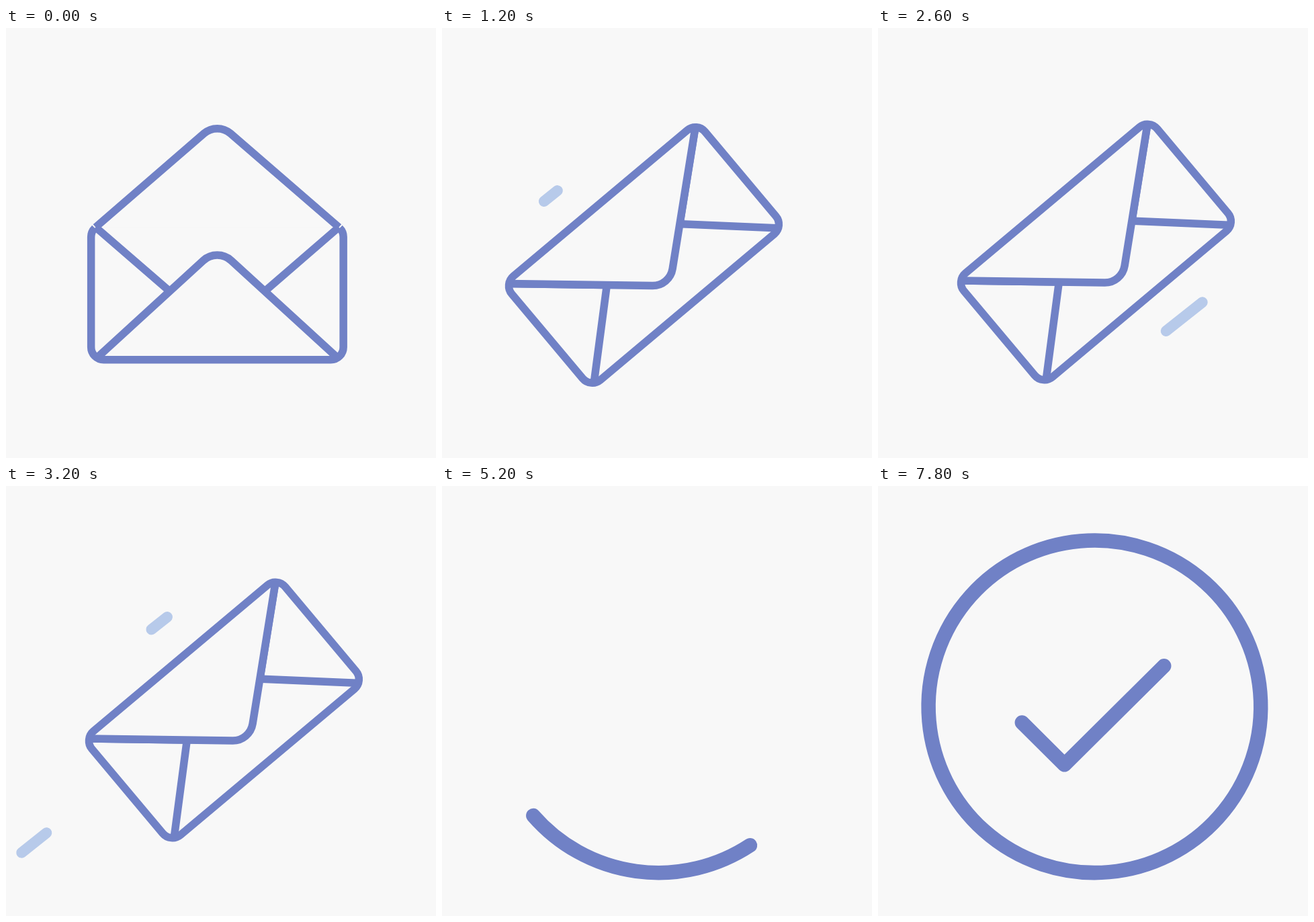
An HTML page with a canvas for the animation above (8 s loop, 640 px wide and 640 px high).

```html
<!DOCTYPE html>
<html lang="en">
<head>
<meta charset="utf-8">
<title>Sending mail</title>
<style>
  html, body { margin: 0; width: 100%; height: 100%; overflow: hidden; background: #f8f8f8; }
  canvas { display: block; width: 640px; height: 640px; }
</style>
</head>
<body>
<canvas id="stage" width="640" height="640"></canvas>
<script>
const ctx = document.getElementById('stage').getContext('2d');
const LOOP = 8000, PAPER = '#f8f8f8', INK = '#7081c6', WIND = '#b7caea';
const PI = Math.PI, rad = deg => deg * PI / 180;
const mix = (a, b, u) => a + (b - a) * u;
const progress = (t, from, to) => Math.min(1, Math.max(0, (t - from) / (to - from)));
const smooth = u => (1 - Math.cos(PI * u)) / 2;

function stroke(color, width) {
  ctx.strokeStyle = color;
  ctx.lineWidth = width;
  ctx.stroke();
}

// ---- Wind streaks: x, y and time of full length, size ----
const streaks = [
  [196.3, 222.6, 1025, 1],
  [240, 129, 2000, 1],
  ...[3050, 4100].map(t => [260, 179, t, 1]),
  ...[2000, 3050, 4100].map(t => [92, 491, t, 60 / 38]),
  ...[1850, 2900, 3950].map(t => [398, 475.5, t, 1])
];

function drawStreak(t, [x, y, peak, size]) {
  const p = t - peak;
  if (p <= -400 || p >= 300) return;
  const late = progress(p, 0, 300);
  const grow = 1 - (1 - progress(p, -400, 0)) ** 2;
  const head = p < 0 ? mix(85, -38, grow) : mix(-38, -49, late);
  const tail = p < 0 ? mix(85, 0, progress(p, -300, 0)) : -49 * late ** 1.3;
  ctx.beginPath();
  for (const d of [tail, head]) ctx.lineTo(x + d * size, y - d * size * 0.795);
  ctx.lineCap = 'round';
  stroke(WIND, 16);
}

// ---- Envelope ----
const LOW = [324.4, 333.5], HIGH = [354.4, 293.8];
const entry = [[700, 314.4, 393], [1100, 301, 355], [1200, 300.3, 338], [1400, ...LOW]];

function envelopeCenter(t) {
  if (t <= 700) return entry[0].slice(1);
  if (t < 1400) {
    const i = entry.findIndex(k => k[0] > t);
    const [t0, x0, y0] = entry[i - 1], [t1, x1, y1] = entry[i];
    const u = progress(t, t0, t1);
    return [mix(x0, x1, u), mix(y0, y1, u)];
  }
  if (t < 4100) {
    const u = (1 - Math.cos(PI * (t - 1400) / 300)) / 2;
    return LOW.map((v, i) => mix(v, HIGH[i], u));
  }
  const u = progress(t, 4100, 4400) ** 2;
  return [HIGH[0] + 560 * u, HIGH[1] - 470 * u];
}

function body(closed) {
  const r = 18.75, end = closed ? PI / 2 : PI / 4;
  ctx.beginPath();
  ctx.arc(-169, -82, r, PI + end, PI, true);
  ctx.arc(-169, 82, r, PI, PI / 2, true);
  ctx.arc(169, 82, r, PI / 2, 0, true);
  ctx.arc(169, -82, r, 0, -end, true);
  if (closed) ctx.closePath();
}

// A rounded peak spanning the envelope; fold = -1 turns it over its base.
function peak(halfWidth, base, tip, radius, fold = 1) {
  ctx.save();
  ctx.translate(0, base);
  ctx.scale(1, fold);
  ctx.beginPath();
  ctx.moveTo(-halfWidth, 0);
  ctx.arcTo(0, tip - base, halfWidth, 0, radius);
  ctx.lineTo(halfWidth, 0);
  ctx.restore();
  ctx.fill();
  stroke(INK, 11.5);
}
const flap = fold => peak(181, -96.5, 60, 30, fold);

function drawEnvelope(t) {
  const fold = -Math.cos(PI * smooth(progress(t, 300, 750)));
  const closed = fold > 0;
  ctx.save();
  ctx.translate(...envelopeCenter(t));
  ctx.rotate(rad(-40 * smooth(progress(t, 700, 1100))));
  ctx.lineCap = 'butt';
  ctx.fillStyle = PAPER;
  if (!closed) flap(fold);
  body(closed);
  ctx.fill();
  flap(1 * !closed || fold);
  peak(177, 96, -66, 31);
  if (closed) flap(fold);
  body(closed);
  stroke(INK, 11.5);
  ctx.restore();
}

// ---- Loader ring and check mark ----
function drawRing(t) {
  const gap = t < 6200 ? mix(1, 0.12, progress(t, 4850, 6200))
                       : mix(0.12, 0, progress(t, 6200, 7450));
  const start = rad(114.2 + 0.418 * (t - 6200));
  ctx.beginPath();
  ctx.arc(322.4, 328.3, 247.3, start, start + 2 * PI * (1 - gap));
  ctx.lineCap = 'round';
  stroke(INK, 21.5);
}

function drawCheck(t) {
  const scale = t < 7700 ? mix(0, 1.05, progress(t, 7540, 7700))
                         : mix(1.05, 1, progress(t, 7700, 7800));
  ctx.save();
  ctx.translate(385, 285);
  ctx.scale(scale, scale);
  ctx.translate(-385, -285);
  ctx.beginPath();
  ctx.moveTo(214.3, 352);
  ctx.lineTo(277.5, 414.8);
  ctx.lineTo(425.7, 267.8);
  ctx.lineCap = ctx.lineJoin = 'round';
  stroke(INK, 21.5);
  ctx.restore();
}

function draw(t) {
  ctx.fillStyle = PAPER;
  ctx.fillRect(0, 0, 640, 640);
  if (t < 4400) {
    streaks.forEach(s => drawStreak(t, s));
    drawEnvelope(t);
  }
  if (t > 4850) drawRing(t);
  if (t > 7550) drawCheck(t);
}

const begin = performance.now();
function tick() {
  draw((performance.now() - begin) % LOOP);
  requestAnimationFrame(tick);
}
tick();
</script>
</body>
</html>
```
